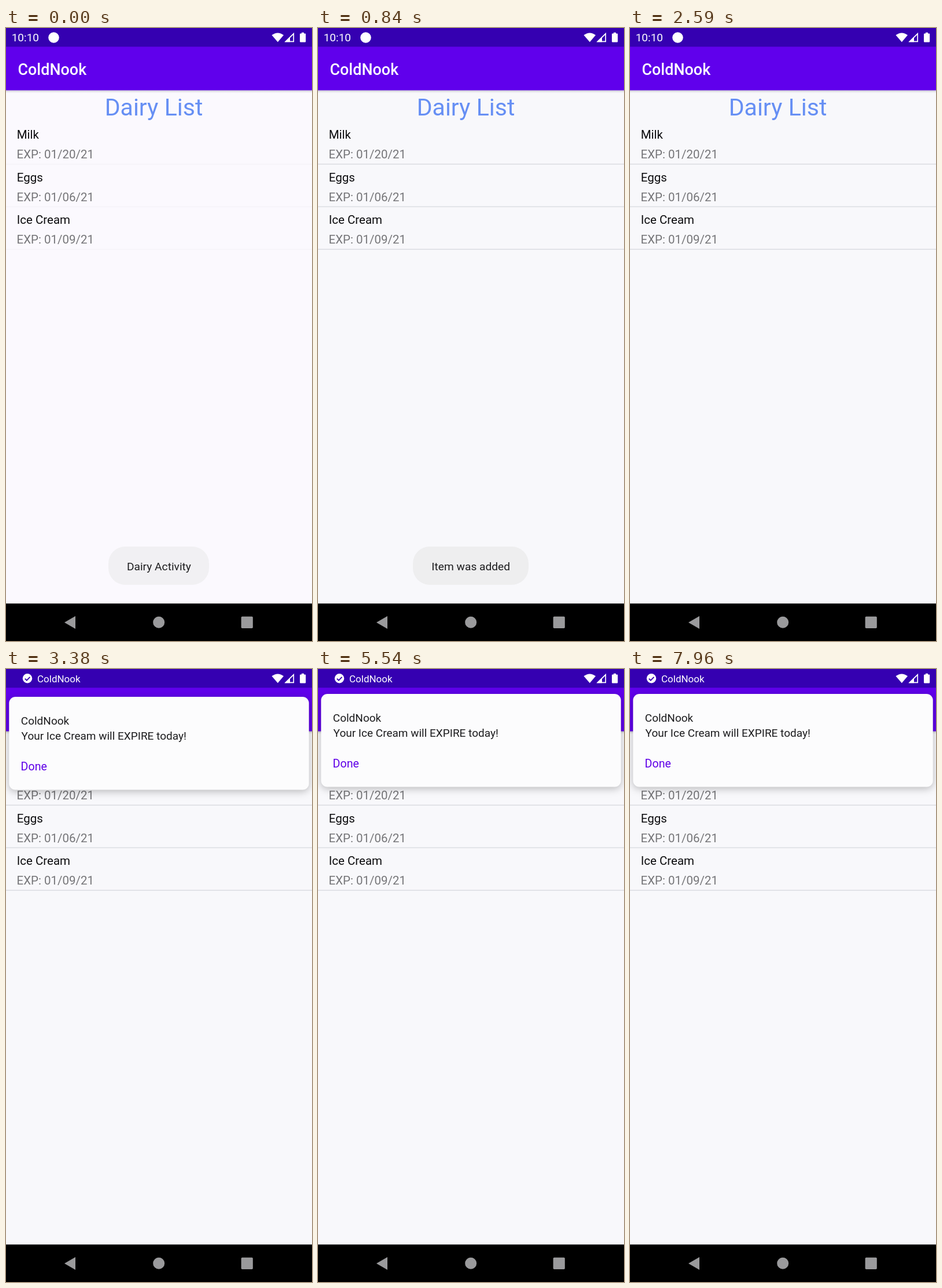
Recreate the animation shown at these times as an HTML page. Size 529x1058 px, loop 8 s.

```html
<!DOCTYPE html>
<html lang="en">
<head>
<meta charset="utf-8">
<title>Dairy List</title>
<style>
  html, body { margin: 0; width: 100%; height: 100%; overflow: hidden; background: #000; }
  svg { display: block; width: 100vw; height: 100vh; }
  text { font-family: Roboto, sans-serif; white-space: pre; }
  .status { fill: #fff; }
  .item { font-size: 20.5px; fill: #0c0c0e; }
  .expiry { font-size: 20.5px; fill: #757578; }
  .toast text { font-size: 19.2px; fill: #1d1d1f; text-anchor: middle; }
  .card text { font-size: 19px; fill: #1c1c1e; }
  .card rect { filter: drop-shadow(0 3px 7px rgba(0, 0, 0, .26)); }
</style>
</head>
<body>
<svg viewBox="0 0 529 1058">
  <defs>
    <linearGradient id="barShadow" x2="0" y2="1">
      <stop stop-color="#55506a" stop-opacity=".3"/>
      <stop offset="1" stop-color="#55506a" stop-opacity="0"/>
    </linearGradient>
  </defs>

  <rect id="page" width="529" height="1058"/>
  <rect y="107" width="529" height="5" fill="url(#barShadow)"/>
  <text x="170.7" y="151" font-size="41" fill="#668ff4">Dairy List</text>
  <g id="list"></g>

  <g class="toast" id="openedToast">
    <rect x="177" y="895" width="174" height="66" rx="29" fill="#eeeeef"/>
    <text x="264.4" y="935.7">Dairy Activity</text>
  </g>
  <g class="toast" id="addedToast">
    <rect x="164" y="895" width="200" height="66" rx="29" fill="#eeeeef"/>
    <text x="264.2" y="935.7">Item was added</text>
  </g>

  <rect y="32" width="529" height="75.5" fill="#6000ec"/>
  <text x="20.5" y="81" font-size="26.9" font-weight="500" fill="#fff">ColdNook</text>
  <rect width="529" height="32.3" fill="#3500b1"/>

  <g class="status" id="clock">
    <text x="9.7" y="23" font-size="19">10:10</text>
    <circle cx="82.5" cy="16.5" r="9.3"/>
  </g>
  <g class="status" id="ticker">
    <circle cx="37" cy="16.3" r="8.2"/>
    <path d="M32.8 16.6l3 3 5.6-5.8" fill="none" stroke="#3500b1" stroke-width="1.9"/>
    <text x="54" y="23" font-size="17">ColdNook</text>
  </g>
  <g class="status">
    <path d="M459.5 12.2Q469.8 4.6 480 12.2L469.8 24.3Z"/>
    <path d="M483.4 23.4L497.2 9.8V23.4Z" fill="none" stroke="#fff" stroke-width="1.7"/>
    <path d="M482 24.2L491 15.2V24.2Z"/>
    <path d="M511 7.8h4v1.8h2q1.2 0 1.2 1.2v12.4q0 1.2-1.2 1.2h-7.8q-1.2 0-1.2-1.2V10.8q0-1.2 1.2-1.2h1.8Z"/>
  </g>

  <g class="card" id="card">
    <rect x="5.3" y="43" width="518.4" height="160.4" rx="11" fill="#fcfcfd"/>
    <text x="25.8" y="91">ColdNook</text>
    <text x="26.6" y="117.4">Your Ice Cream will EXPIRE today!</text>
    <text x="25.6" y="170.2" style="font-size:19.6px;fill:#6000e8">Done</text>
  </g>

  <rect y="993.3" width="529" height="65" fill="#000"/>
  <g fill="#9a9a9c">
    <path d="M101 1026L120 1015V1037Z"/>
    <circle cx="264.2" cy="1025.8" r="10"/>
    <rect x="406.6" y="1015.8" width="20.2" height="20.2" rx="1.8"/>
  </g>
</svg>
<script>
const LOOP = 8000;
const CARD_START = 3004;
const CARD_DURATION = 550;
const CARD_TRAVEL = 210;

const $ = id => document.getElementById(id);
const ramp = (t, from, to) => Math.min(1, Math.max(0, (t - from) / (to - from)));
const lerp = (a, b, k) => a + (b - a) * k;
const smooth = u => u * u * (3 - 2 * u);

const items = [['Milk', '01/20/21'], ['Eggs', '01/06/21'], ['Ice Cream', '01/09/21']];
$('list').innerHTML = items.map(([name, date], i) => {
  const y = 191 + i * 73.5;
  return `<text class="item" x="18.7" y="${y}">${name}</text>
    <text class="expiry" x="18.5" y="${y + 34.2}">EXP: ${date}</text>
    <rect class="divider" y="${y + 43.2}" width="529" height="1.5" fill="#dbdde2"/>`;
}).join('');
const dividers = document.querySelectorAll('.divider');

// Rises past the resting place, dips just short of it, then settles.
function cardProgress(f) {
  if (f < .5) return 1.125 * smooth(smooth(f / .5));
  if (f < .8) return lerp(1.125, .975, smooth((f - .5) / .3));
  return lerp(.975, 1, smooth((f - .8) / .2));
}

function draw(t) {
  const settle = ramp(t, 40, 400);
  const tint = [[251, 248], [249, 248], [254, 251]].map(([a, b]) => Math.round(lerp(a, b, settle)));
  $('page').setAttribute('fill', `rgb(${tint})`);
  dividers.forEach(d => d.setAttribute('opacity', lerp(.2, 1, settle)));

  $('openedToast').setAttribute('opacity', 1 - ramp(t, 120, 340));
  $('openedToast').firstElementChild.setAttribute('opacity', .75);
  $('addedToast').setAttribute('opacity', ramp(t, 360, 580) * (1 - ramp(t, 2300, 2520)));

  const notified = t >= CARD_START;
  $('clock').style.display = notified ? 'none' : '';
  $('ticker').style.display = notified ? '' : 'none';
  $('card').style.display = notified ? '' : 'none';
  const progress = cardProgress(ramp(t, CARD_START, CARD_START + CARD_DURATION));
  $('card').setAttribute('transform', `translate(0 ${(progress - 1) * CARD_TRAVEL})`);
}

const start = performance.now();
function tick() {
  draw((performance.now() - start) % LOOP);
  requestAnimationFrame(tick);
}
draw(0);
requestAnimationFrame(tick);
</script>
</body>
</html>
```
